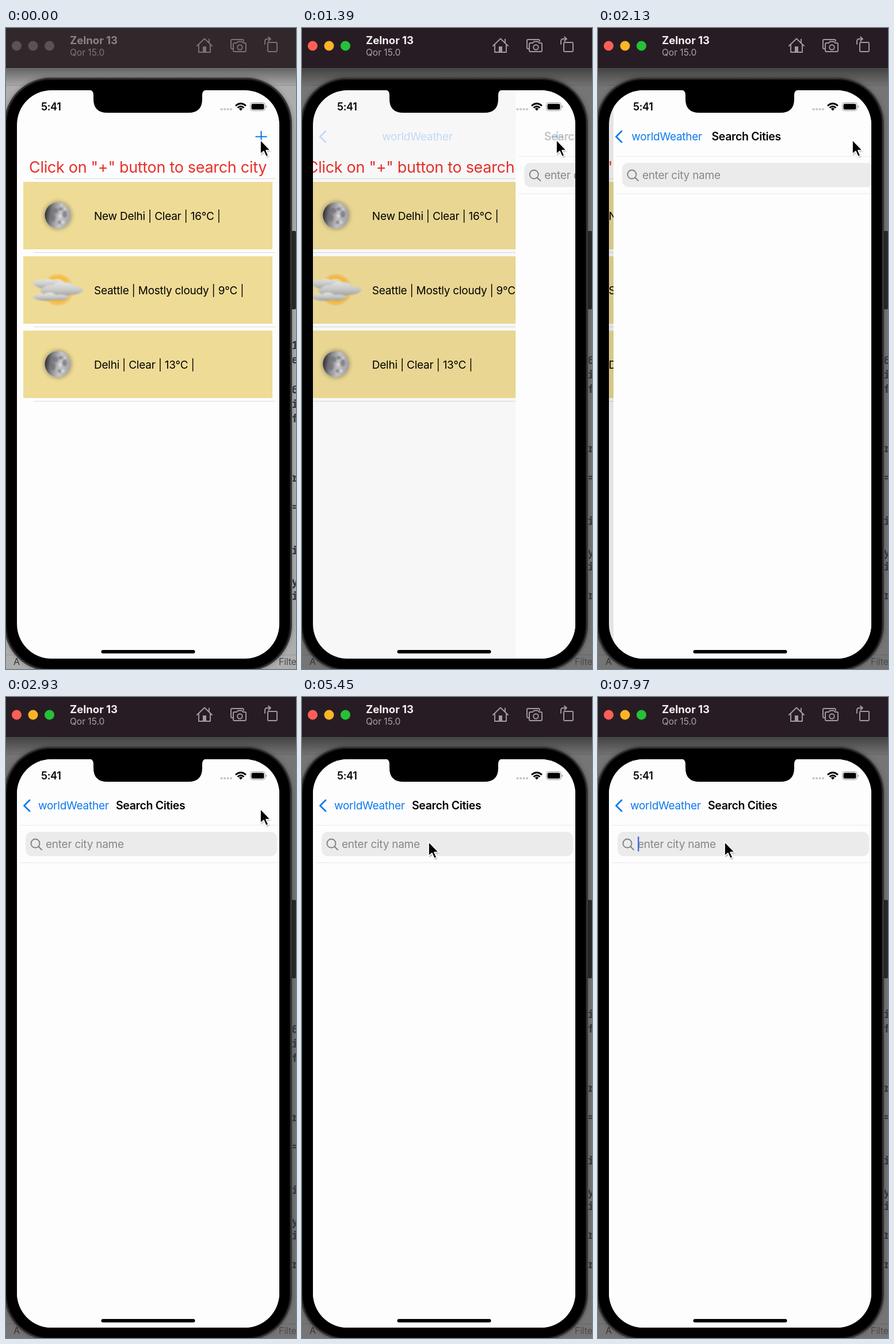
Write an HTML page that moves like this. It is 504x1112 px and loops after 7.99 s.

```html
<!DOCTYPE html>
<html lang="en">
<head>
<meta charset="utf-8">
<title>Weather app</title>
<style>
  html, body { margin: 0; width: 100%; height: 100%; overflow: hidden; background: #777; }
  svg { display: block; width: 504px; height: 1112px; }
  text { font: 19px Inter, "Liberation Sans", sans-serif; letter-spacing: -.25px; white-space: pre; }
  .semi { font-weight: 600; letter-spacing: -.35px; }
  .mono { font: 600 20px "Noto Sans Mono", "DejaVu Sans Mono", monospace; fill: #3c3a42; }
  .line { fill: none; stroke-linecap: round; stroke-linejoin: round; }
  #desk { fill: #757575; }
  #bar { fill: #281c24; }
  #tools { stroke: #a29a9f; }
  #tools .solid { fill: #a29a9f; stroke: none; }
  #name { fill: #f3f0f2; }
  #version { fill: #aaa2a7; }
  .idle #desk { fill: #adadad; }
  .idle #bar { fill: #31282c; }
  .idle #lights circle { fill: #5c5155; }
  .idle #tools { stroke: #7b7276; }
  .idle #tools .solid { fill: #7b7276; }
  .idle #name { fill: #8a8286; }
  .idle #version { fill: #7d7579; }
</style>
</head>
<body>
<svg id="stage" viewBox="0 0 504 1112" class="idle">
  <defs>
    <clipPath id="screen"><rect x="19" y="108" width="456" height="986" rx="60"/></clipPath>
    <clipPath id="console"><rect x="498" y="536" width="6" height="464"/></clipPath>
    <linearGradient id="barShade" x2="0" y2="1">
      <stop stop-opacity=".45"/><stop offset="1" stop-opacity="0"/>
    </linearGradient>
    <linearGradient id="moonFill" x2="1" y2=".15">
      <stop offset=".05" stop-color="#2a2a2e"/><stop offset=".35" stop-color="#88888c"/>
      <stop offset=".65" stop-color="#c6c6ca"/><stop offset="1" stop-color="#a8a8ab"/>
    </linearGradient>
    <radialGradient id="sunFill">
      <stop offset=".4" stop-color="#ffe23c"/><stop offset=".75" stop-color="#fbbb34"/>
      <stop offset="1" stop-color="#f6a836" stop-opacity=".15"/>
    </radialGradient>
    <linearGradient id="cloudFill" x2="0" y2="1">
      <stop stop-color="#e8e8e8"/><stop offset=".55" stop-color="#cacac8"/><stop offset="1" stop-color="#a0a09e"/>
    </linearGradient>
    <filter id="soft" x="-30%" y="-30%" width="160%" height="160%"><feGaussianBlur stdDeviation="3"/></filter>
    <filter id="fuzz"><feGaussianBlur stdDeviation=".8"/></filter>
    <g id="moon">
      <circle r="25" fill="#77705a" opacity=".5" filter="url(#soft)"/>
      <circle r="22.5" fill="url(#moonFill)"/>
      <g fill="#6e6e74" opacity=".65" filter="url(#fuzz)">
        <ellipse cx="-5" cy="-8" rx="6" ry="5"/><ellipse cx="5" cy="-11" rx="4" ry="3"/>
        <ellipse cx="12" cy="-2" rx="4" ry="6"/><ellipse cx="-9" cy="4" rx="5" ry="7"/>
        <circle cx="3" cy="12" r="3"/>
      </g>
      <g fill="#e4e4e6" opacity=".7" filter="url(#fuzz)">
        <circle cx="4" cy="1" r="3"/><circle cx="9" cy="12" r="3"/><circle cx="13" cy="-11" r="2"/>
      </g>
    </g>
    <g id="cloud">
      <circle r="28" fill="url(#sunFill)"/>
      <g fill="url(#cloudFill)" filter="url(#fuzz)">
        <path d="M-44-11Q-38-20-27-16Q-18-22-9-17Q4-21 11-13Q24-15 26-8Q14 0-8-2Q-33 2-44-11Z"/>
        <path d="M-31 2Q-22-10-8-8Q2-18 15-11Q23-13 28-6Q42-6 45 1Q36 10 21 9Q6 14-5 9Q-24 12-31 2Z"/>
        <path d="M-44 13Q-36 4-25 8Q-13 1-3 9Q14 7 21 14Q8 21-7 18Q-32 22-44 13Z"/>
      </g>
    </g>
  </defs>

  <rect id="desk" width="504" height="1112"/>
  <path d="M0 99.5H504M0 1087.5H504" stroke="#000" opacity=".12"/>
  <rect y="68" width="504" height="34" fill="url(#barShade)"/>
  <text x="13" y="1105" style="font-size:16px" fill="#333">A</text>
  <text x="474" y="1105" style="font-size:16px" fill="#4b4b4b">Filter</text>
  <g clip-path="url(#console)"><g id="log"></g></g>

  <rect x="496" y="352" width="8" height="136" rx="2" fill="#2a2a2a"/>
  <rect x="-4" y="85" width="502" height="1032" rx="82" fill="#000" opacity=".25" filter="url(#soft)"/>
  <rect x="-1.5" y="87.5" width="497" height="1027" rx="79" fill="#000" stroke="#353535" stroke-width="3"/>
  <rect x="1" y="90" width="492" height="1022" rx="77" fill="#000" stroke="#171717"/>

  <g clip-path="url(#screen)">
    <rect x="19" y="108" width="456" height="986" fill="#fdfdfd"/>
    <g id="list">
      <text x="40" y="251" fill="#e9302a" style="font-size:27px;letter-spacing:-.31px">Click on "+" button to search city</text>
      <path d="M48 261.5H468M48 389.5H468M48 518.5H468M48 647.5H468" stroke="#d9d9dc"/>
      <g id="rows"></g>
    </g>
    <rect id="dim" x="19" y="108" width="456" height="986"/>
    <g id="search">
      <rect x="19" y="108" width="456" height="986" fill="#fdfdfd"/>
      <path d="M24 222.5H475M24 287.5H475" stroke="#e9e9e9"/>
      <rect x="34" y="234" width="437" height="42" rx="11" fill="#ebebec"/>
      <g class="line" stroke="#808085" stroke-width="1.9"><circle cx="51" cy="254" r="7.5"/><path d="M56.5 259.5L62 265"/></g>
      <text x="69" y="262" fill="#87878b">enter city name</text>
      <rect id="caret" x="69" y="242" width="2.4" height="26" rx="1" fill="#4468dc"/>
    </g>
    <path id="plus" d="M433.5 188.5H453.5M443.5 178.5V198.5" stroke="#0b76e4" stroke-width="2"/>
    <g id="nav">
      <path class="line" d="M41 179L31.5 188.5L41 198" stroke="#0b79ee" stroke-width="2.8"/>
      <text id="back" y="195" fill="#0b79ee">worldWeather</text>
      <text id="heading" class="semi" y="195" style="font-size:19.5px">Search Cities</text>
    </g>
    <text class="semi" x="61" y="143" style="font-size:18px">5:41</text>
    <g fill="#c6c3d2"><circle cx="374.5" cy="141" r="2.1"/><circle cx="380" cy="141" r="2.1"/><circle cx="385.5" cy="141" r="2.1"/><circle cx="391" cy="141" r="2.1"/></g>
    <g class="line" stroke="#000" stroke-width="2.7" style="stroke-linecap:butt">
      <path d="M399 135Q408 127 417 135M402.5 138.5Q408 133.5 413.5 138.5"/>
      <path d="M404.8 140Q408 137 411.2 140L408 143.5Z" fill="#000" stroke="none"/>
    </g>
    <rect x="424.5" y="129.5" width="26" height="14" rx="4" fill="none" stroke="#999"/>
    <rect x="426.5" y="131.5" width="22" height="10" rx="2.5"/>
    <path d="M452 134Q455 136.5 452 139Z" fill="#999"/>
    <path d="M144 107Q152 108 152 116V123Q152 147 176 147H317Q341 147 341 123V116Q341 108 349 107Z"/>
    <rect x="165.5" y="1079" width="163" height="6" rx="3"/>
  </g>

  <rect id="bar" width="504" height="68.5"/>
  <path d="M0 68.5H504" stroke="#171114"/>
  <g id="lights">
    <circle cx="18.5" cy="31" r="8.5" fill="#fe5f57"/><circle cx="47" cy="31" r="8.5" fill="#fdb527"/><circle cx="75.5" cy="31" r="8.5" fill="#25c138"/>
  </g>
  <text id="name" x="111" y="28" style="font-size:18.5px;font-weight:700;letter-spacing:0">Zelnor 13</text>
  <text id="version" x="111" y="48" style="font-size:15.5px;letter-spacing:0">Qor 15.0</text>
  <g id="tools" class="line" stroke-width="1.9">
    <path d="M332 31L345 18.5L358 31M335 29V42H355V29M353 25V19.5"/>
    <path class="solid" d="M342 32H348V42H342Z"/>
    <path d="M394 36H393Q391 36 391 34V22Q391 20 393 20H411Q413 20 413 23"/>
    <path d="M397 26H401L403 23.5H410L412 26H415Q417 26 417 28V39Q417 41 415 41H397Q395 41 395 39V28Q395 26 397 26Z"/>
    <circle cx="406.5" cy="33.5" r="4.2"/>
    <rect x="455" y="25" width="16" height="16" rx="1.5"/>
    <path d="M450 28V23Q450 19 454 19H459M456 15.5L460 19L456 22.5"/>
  </g>

  <g id="cursor">
    <path d="M1 3V27L7 21.5L11 31L15 29L11 20H19Z" opacity=".4" filter="url(#fuzz)"/>
    <path d="M0 0V25L5.8 19.8L9.8 29L14 27.2L10 18.3H17.8Z" stroke="#fff" stroke-width="1.7" stroke-linejoin="round"/>
  </g>
</svg>
<script>
const LOOP = 7990;
const $ = id => document.getElementById(id);
const move = (id, x, y = 0) => $(id).setAttribute('transform', `translate(${x} ${y})`);
const ease = (n, from, to) => {
  const u = Math.min(1, Math.max(0, (n - from) / (to - from)));
  return u * u * (3 - 2 * u);
};

$('rows').innerHTML = [
  ['moon', 'New Delhi | Clear | 16°C |'],
  ['cloud', 'Seattle | Mostly cloudy | 9°C |'],
  ['moon', 'Delhi | Clear | 13°C |']
].map(([icon, label], i) => `<g transform="translate(0 ${267 + 129 * i})">
  <rect x="30" width="433" height="117" fill="#eedb96"/>
  <use href="#${icon}" x="90" y="58"/>
  <text x="153" y="65.5">${label}</text></g>`).join('');

$('log').innerHTML = [
  ['1', 550], ['e', 575], ['6', 627], ['i', 652], ['f', 677], ['r', 780],
  ['=', 831], ['i', 906], ['y', 960], ['i', 985], ['r', 1035], ['r', 1086]
].map(([c, y]) => `<text class="mono" x="496" y="${y + 7}">${c}</text>`).join('');

// Pictures advance in groups of three per 140 ms: two short, one long.
function step(t) {
  const phase = (t + 10) % 140;
  return 3 * Math.floor((t + 10) / 140) + (phase < 20 ? 0 : phase < 40 ? 1 : 2);
}

function draw() {
  const n = step(performance.now() % LOOP);

  // Critically damped push of the search page
  const k = Math.max(0, n - 27) * 0.3;
  let rest = (1 + k) * Math.exp(-k);
  if (rest < 0.002) rest = 0;
  const shown = 1 - rest, navRest = rest ** 0.94;

  $('stage').classList.toggle('idle', n < 8);
  move('list', -137 * shown);
  move('search', 456 * rest);
  $('dim').setAttribute('opacity', 0.1 * shown);
  $('plus').setAttribute('opacity', n < 24 ? 1 : 0.35 * rest);
  $('nav').setAttribute('opacity', shown);
  $('back').setAttribute('x', 56 + 106 * navRest);
  $('heading').setAttribute('x', 191 + 293 * navRest);
  move('log', 0, -51 * ((n >= 27) + (n >= 114)));

  const a = ease(n, 67, 88), b = ease(n, 92, 102);
  move('cursor', 442 - 209 * a - 13 * b, 194 + 45 * a + 12 * b);
  $('caret').setAttribute('opacity', n >= 118 && (n - 118) % 23 < 12 ? 1 : 0);
  requestAnimationFrame(draw);
}
draw();
</script>
</body>
</html>
```
